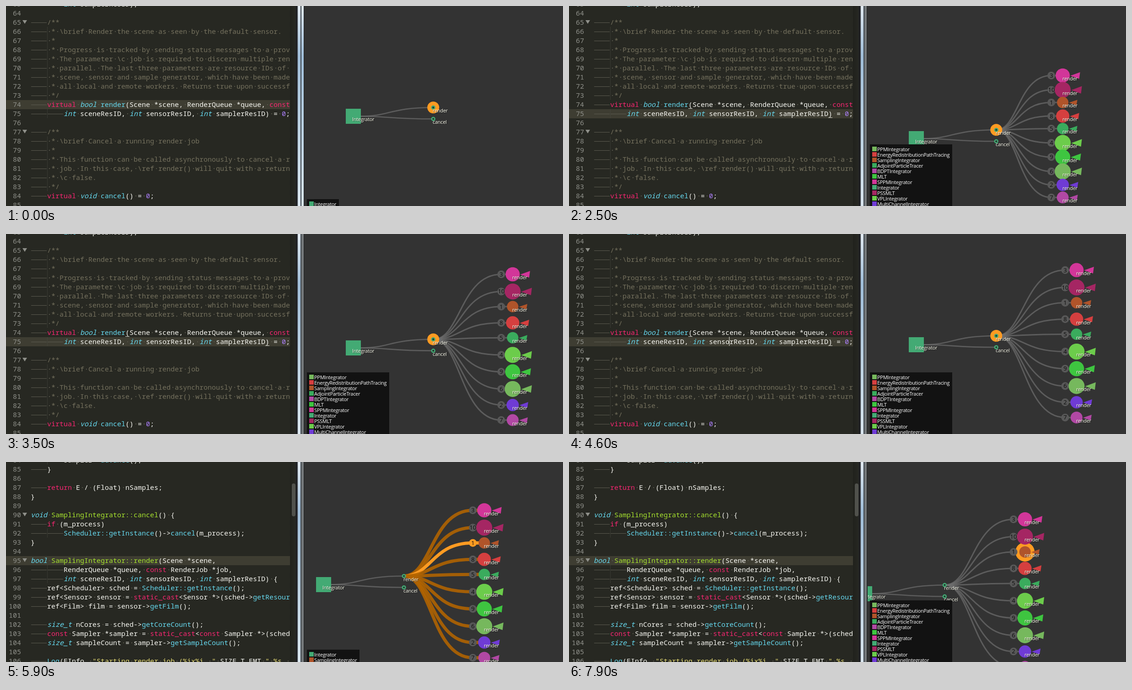
These frames come from a looping animation (1218x438 px, 8000 ms). An HTML page with a canvas:

```html
<!DOCTYPE html>
<html lang="en">
<head>
<meta charset="utf-8">
<title>Call graph beside code</title>
<style>
html, body { margin: 0; width: 100%; height: 100%; overflow: hidden; background: #333; }
canvas { display: block; }
</style>
</head>
<body>
<canvas id="stage" width="1218" height="438"></canvas>
<script>
const W = 1218, H = 438, LOOP = 8000, STEP = 100;
const ctx = document.getElementById('stage').getContext('2d');

// Editor
const MONO = '15px "Noto Sans Mono", "DejaVu Sans Mono", monospace';
const CHAR = 9, ROW = 20, TAB = 36, CODE_X = 54, CODE_END = 621;
const KEYWORDS = /^(virtual|const|return|if|static_cast)$/;
const TYPES = /^(bool|int|void|size_t)$/;
const TOKEN = /"[^"]*"?|(?:\w+::)?\w+(?=\()|\w+|[^\w\s"]+/g;

const header = {
  first: 63, folds: [65, 77], guides: [66, 67, 68, 69, 70, 71, 72, 73, 75, 78, 79, 80, 81, 82, 83],
  lines: `\t\tint samplerResID);

\t/**
\t * \\brief Render the scene as seen by the default sensor.
\t *
\t * Progress is tracked by sending status messages to a provided
\t * The parameter \\c job is required to discern multiple render
\t * parallel. The last three parameters are resource IDs of the
\t * scene, sensor and sample generator, which have been made
\t * all local and remote workers. Returns true upon successful
\t */
\tvirtual bool render(Scene *scene, RenderQueue *queue, const
\t\tint sceneResID, int sensorResID, int samplerResID) = 0;

\t/**
\t * \\brief Cancel a running render job
\t *
\t * This function can be called asynchronously to cancel a running
\t * job. In this case, \\ref render() will quit with a return
\t * \\c false.
\t */
\tvirtual void cancel() = 0;
`.split('\n')
};
const body = {
  first: 84, folds: [90, 95], guides: [84, 92, 96, 97],
  lines: `\t\tsampler->advance();
\t}

\treturn E / (Float) nSamples;
}

void SamplingIntegrator::cancel() {
\tif (m_process)
\t\tScheduler::getInstance()->cancel(m_process);
}

bool SamplingIntegrator::render(Scene *scene,
\t\tRenderQueue *queue, const RenderJob *job,
\t\tint sceneResID, int sensorResID, int samplerResID) {
\tref<Scheduler> sched = Scheduler::getInstance();
\tref<Sensor> sensor = static_cast<Sensor *>(sched->getResource(
\tref<Film> film = sensor->getFilm();

\tsize_t nCores = sched->getCoreCount();
\tconst Sampler *sampler = static_cast<const Sampler *>(sched
\tsize_t sampleCount = sampler->getSampleCount();

\tLog(EInfo, "Starting render job (%ix%i, " SIZE_T_FMT " %s, "`.split('\n')
};

// Graph
const UI = '"Open Sans", "Noto Sans", sans-serif', TIGHT = '-0.3px';
const ORANGE = '#ff9b22', GREEN = '#43aa74';
const BROWN = 'rgba(179,101,0,.88)', GREY = 'rgba(110,110,110,.7)';
const classes = [
  ['PPMIntegrator', '#76b85d'], ['EnergyRedistributionPathTracing', '#d53f3f'],
  ['SamplingIntegrator', '#b0542a'], ['AdjointParticleTracer', '#3aab5d'],
  ['BDPTIntegrator', '#b148a4'], ['MLT', '#3ec540'], ['SPPMIntegrator', '#d23699'],
  ['Integrator', GREEN], ['PSSMLT', '#a52663'], ['VPLIntegrator', '#6ccc4b'],
  ['MultiChannelIntegrator', '#6f3bd5']
];
const color = Object.fromEntries(classes);
// pin label, offset from the port, radius, class
const nodes = [
  [3, -144, 15.5, 'SPPMIntegrator'], [10, -106, 17.5, 'PSSMLT'],
  [1, -72.5, 12.5, 'SamplingIntegrator'], [8, -36.5, 14.5, 'EnergyRedistributionPathTracing'],
  [5, -3.5, 12.5, 'AdjointParticleTracer'], [4, 34.5, 17.5, 'VPLIntegrator'],
  [9, 72, 16.5, 'MLT'], [6, 110, 17.5, 'PPMIntegrator'],
  [2, 145.5, 13.5, 'MultiChannelIntegrator'], [7, 179, 13, 'BDPTIntegrator']
];
const RATE = 2.7, CLICK = 500, EXPAND = 1900, JUMP = 5300, UNHOVER = 7100, PICK = 7500;

const clamp = v => Math.max(0, Math.min(1, v));
const settle = sec => sec > 0 ? 1 - Math.exp(-RATE * sec) : 0;

function rect(x, y, w, h, fill) {
  ctx.fillStyle = fill;
  ctx.fillRect(x, y, w, h);
}
function disc(x, y, r, fill) {
  ctx.fillStyle = fill;
  ctx.beginPath();
  ctx.arc(x, y, r, 0, 2 * Math.PI);
  ctx.fill();
}
function poly(points, fill) {
  ctx.fillStyle = fill;
  ctx.beginPath();
  points.forEach(p => ctx.lineTo(...p));
  ctx.fill();
}
function text(str, x, y, fill) {
  ctx.fillStyle = fill;
  ctx.fillText(str, x, y);
}

function tokenColor(tok, src, end) {
  if (tok[0] === '"') return '#e6db74';
  if (KEYWORDS.test(tok)) return '#f92672';
  if (TYPES.test(tok)) return '#66d9ef';
  if (/^\d+$/.test(tok)) return '#ae81ff';
  if (/^SamplingIntegrator::/.test(tok)) return '#a6e22e';
  if (/^\w/.test(tok) && src[end] === '(') return '#66d9ef';
  return '#f8f8f2';
}

function drawLine(line, base) {
  const tabs = line.match(/^\t*/)[0].length;
  const src = line.slice(tabs), x0 = CODE_X + tabs * TAB;
  for (let i = 0; i < tabs; i++) rect(CODE_X + i * TAB + 1, base - 5, TAB - 2, 1, '#5c5b50');
  ctx.font = MONO;
  if (/^(\/\*| \*)/.test(src)) {
    text(src, x0, base, '#75715e');
  } else {
    for (const m of src.matchAll(TOKEN)) {
      const tok = m[0];
      ctx.font = (TYPES.test(tok) ? 'italic ' : '') + MONO;
      text(tok, x0 + m.index * CHAR, base, tokenColor(tok, src, m.index + tok.length));
    }
  }
  for (let i = 0; i < src.length; i++)
    if (src[i] === ' ') rect(x0 + i * CHAR + 4, base - 6, 2, 2, '#56554a');
}

// Soft blink that stays on right after a click
function caretAlpha(age) {
  const p = age % 970;
  return age < 300 ? 1 : Math.min(clamp((p - 60) / 180), clamp((600 - p) / 200));
}

function drawEditor(t) {
  const jumped = t >= JUMP, clicked = t >= CLICK;
  const doc = jumped ? body : header;
  const current = jumped ? 95 : clicked ? 75 : 74;
  const baseOf = n => 221 + (n - (jumped ? 95 : 74)) * ROW;

  ctx.save();
  ctx.beginPath();
  ctx.rect(0, 0, CODE_END, H);
  ctx.clip();
  rect(0, 0, CODE_END, H, '#272822');
  rect(0, baseOf(current) - 15, CODE_END, ROW, '#3e3d32');

  for (const n of doc.guides)
    for (let y = 0; y < ROW; y += 2) rect(90, baseOf(n) - 15 + y, 1, 1, '#4a4b44');

  doc.lines.forEach((line, i) => {
    const n = doc.first + i, base = baseOf(n);
    ctx.font = MONO;
    ctx.textAlign = 'right';
    text(n, 33, base, '#8f908a');
    ctx.textAlign = 'left';
    drawLine(line, base);
    if (doc.folds.includes(n)) poly([[36, base - 10], [46, base - 10], [41, base - 2]], '#8f908a');
  });

  if (clicked && !jumped) {
    rect(261, 224, 9, 1, '#d8d8d0');
    rect(567, 244, 9, 1, '#d8d8d0');
  }
  if (clicked) {
    ctx.globalAlpha = caretAlpha(t - (jumped ? JUMP - 240 : CLICK));
    rect(jumped ? 278 : 350, jumped ? 206 : 225, 1, ROW, '#f8f8f0');
    ctx.globalAlpha = 1;
  }
  ctx.restore();
}

function drawBorder(t) {
  const shade = ctx.createLinearGradient(621, 0, 638, 0);
  shade.addColorStop(0, '#20211c');
  shade.addColorStop(0.6, '#262721');
  shade.addColorStop(1, '#1c1d26');
  rect(621, 0, 17, H, shade);
  if (t >= JUMP) {
    ctx.fillStyle = '#50514c';
    ctx.beginPath();
    ctx.roundRect(625, 47, 8, 72, 4);
    ctx.fill();
  }
  const glass = ctx.createLinearGradient(0, 0, 0, H);
  glass.addColorStop(0, '#dfe7ee');
  glass.addColorStop(0.25, '#9fbdd8');
  glass.addColorStop(0.6, '#b9cfe0');
  glass.addColorStop(1, '#d8e4ed');
  rect(637, 0, 1, H, '#4c5054');
  rect(638, 0, 6, H, glass);
  rect(644, 0, 2, H, '#3a4148');
  rect(646, 0, 5, H, glass);
  ctx.globalAlpha = clamp(t / 300);
  rect(646, 0, 5, H, '#74787a');
  ctx.globalAlpha = 1;
  rect(651, 0, 2, H, '#2a2c2d');
}

function edge(x0, y0, x1, y1, stroke, width, tail = 0) {
  const bend = 0.4 * (x1 - x0);
  ctx.strokeStyle = stroke;
  ctx.lineWidth = width;
  ctx.beginPath();
  ctx.moveTo(x0, y0);
  ctx.bezierCurveTo(x0 + bend, y0, x1 - 1.5 * bend, y1, x1, y1);
  ctx.lineTo(x1 + tail, y1);
  ctx.stroke();
}
function label(str, x, y) {
  x = Math.round(x);
  y = Math.round(y);
  ctx.font = '11px ' + UI;
  ctx.letterSpacing = TIGHT;
  text(str, x + 1, y + 1, 'rgba(0,0,0,.55)');
  text(str, x, y, '#fffff0');
  ctx.letterSpacing = '0px';
}
function port(name, x, y, hovered) {
  if (hovered) disc(x, y, 13, ORANGE);
  disc(x, y, 4.6, GREEN);
  disc(x, y, 2.1, '#23352d');
  label(name, x - 1, y + 11);
}

function drawNodes(px, py, spread, hover) {
  const cx = px + 175.7 * spread, pin = cx - 25;
  const onEdge = hover === 'edge';
  const place = nodes.map(([id, dy, r, cls]) => ({ id, r, fill: color[cls], y: py + dy * spread }));

  for (const { id, y } of place)
    edge(px, py, pin, y, !onEdge ? GREY : id === 1 ? ORANGE : BROWN, onEdge ? 7 : 3, 20);
  if (hover === 'node') disc(cx, place.find(n => n.id === 1).y, 21, ORANGE);

  for (const { id, r, fill, y } of place) {
    disc(pin, y, 8.5, onEdge && id === 1 ? ORANGE : '#585858');
    ctx.font = '13px ' + UI;
    ctx.textAlign = 'center';
    text(id, Math.round(pin), Math.round(y + 4.5), '#0c0c0c');
    ctx.textAlign = 'left';
    const far = 2 * r + 7, h = 0.47 * r;
    poly([[cx + r + 1, y + 0.5], [cx + far, y - h], [cx + far - 2, y + h]], fill);
    disc(cx, y, r, fill);
    label('render', cx - 1, y + 11);
  }
}

function drawLegend(rows) {
  const top = 435 - 12 * rows.length;
  ctx.font = '11px ' + UI;
  ctx.letterSpacing = TIGHT;
  const wide = Math.max(...rows.map(([name]) => ctx.measureText(name).width));
  rect(658, top, Math.round(wide + 22), H - top, '#121212');
  rows.forEach(([name, fill], i) => {
    const y = top + 5 + 12 * i;
    rect(663, y, 10, 10, fill);
    text(name, 674, y + 10, '#fff');
  });
  ctx.letterSpacing = '0px';
}

function drawGraph(t) {
  ctx.save();
  ctx.beginPath();
  ctx.rect(653, 0, W - 653, H);
  ctx.clip();
  rect(653, 0, W - 653, H, '#333');

  // The tree grows while the view eases back to its centre
  const u = t >= EXPAND ? (t - EXPAND + 50) / 1000 : 0;
  const lift = 161.5 * RATE * u * Math.exp(-RATE * u);
  const pan1 = settle((t - JUMP - 100) / 1000), pan2 = settle((t - PICK + 50) / 1000);
  const dx = -86.6 * pan1 - 37.5 * pan2;
  const dy = lift + 37 * pan1 + 14.5 * pan2;
  const hover = t < JUMP ? 'port' : t < UNHOVER ? 'edge' : t < PICK ? '' : 'node';

  const sx = Math.round(742.6 + dx), sy = Math.round(225 + dy), px = 934.3 + dx, py = 222.3 + dy;
  edge(sx + 33, sy + 16.5, px, py, GREY, 2.6);
  edge(sx + 33, sy + 16.5, px, py + 25, GREY, 2.6);
  rect(sx, sy, 33, 33, GREEN);
  label('Integrator', sx + 14, sy + 27);

  if (u > 0) drawNodes(px, py, settle(u), hover);
  port('render', px, py, hover === 'port');
  port('cancel', px, py + 25, false);

  const only = names => names.map(n => [n, color[n]]);
  drawLegend(u === 0 ? only(['Integrator'])
    : hover === 'edge' ? only(['Integrator', 'SamplingIntegrator']) : classes);
  ctx.restore();
}

function frame(now) {
  const t = Math.floor(now % LOOP / STEP) * STEP;
  drawEditor(t);
  drawBorder(t);
  drawGraph(t);
  requestAnimationFrame(() => frame(performance.now()));
}
frame(0);
</script>
</body>
</html>
```
